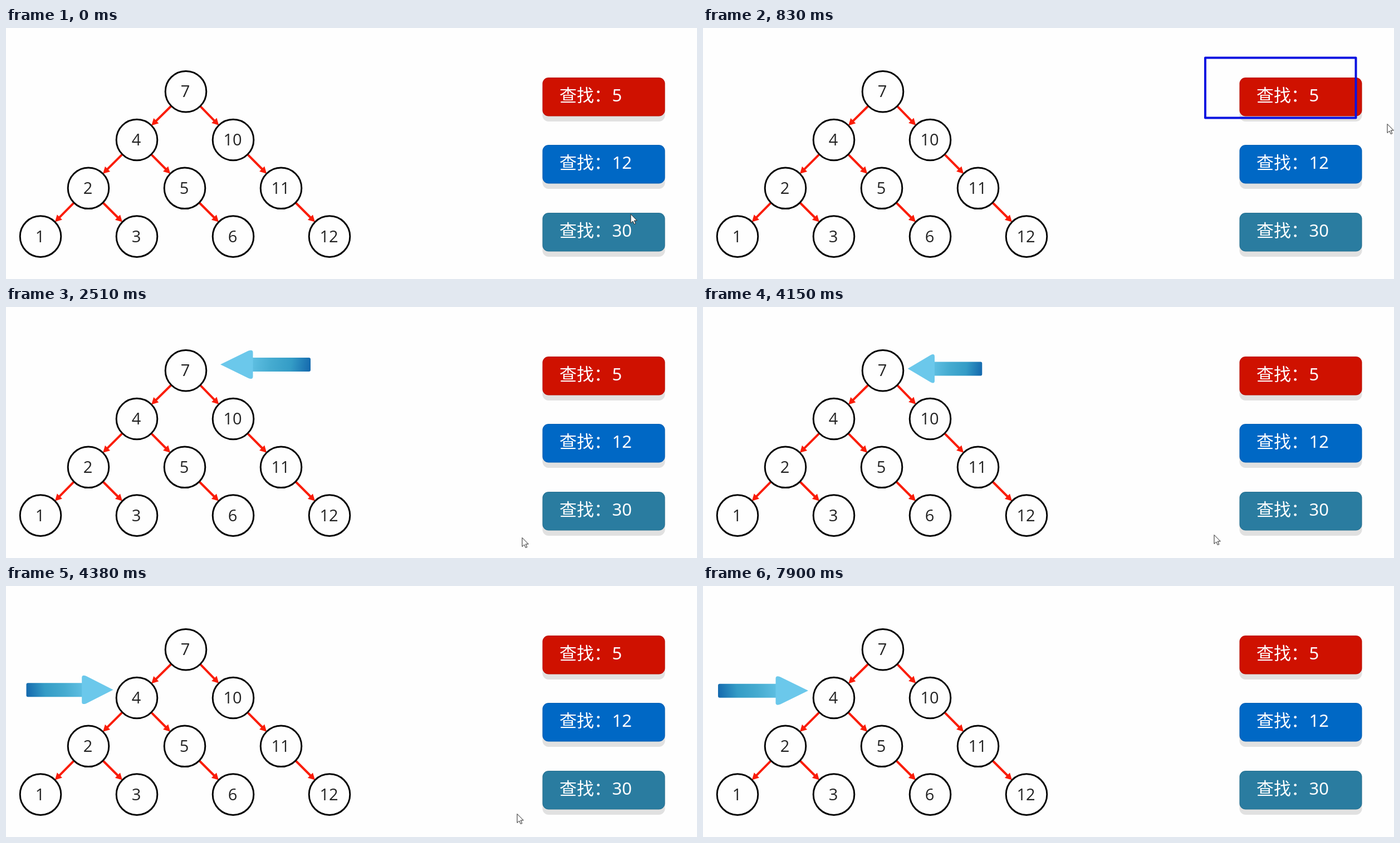
An HTML page with a canvas for the animation above (8000 ms loop, 1241 px wide and 451 px high).

```html
<!DOCTYPE html>
<html lang="zh-CN">
<head>
<meta charset="utf-8">
<title>二叉树查找</title>
<style>
html, body { margin: 0; width: 100%; height: 100%; overflow: hidden; background: #fefefe; }
canvas { display: block; }
</style>
</head>
<body>
<canvas id="stage" width="1241" height="451"></canvas>
<script>
const ctx = document.getElementById('stage').getContext('2d');
const LOOP = 8000;
const RADIUS = 36.8;
const ROW = 86.8;
const BUTTONS = [['5', '#cf1100'], ['12', '#0068c5'], ['30', '#2a7ca0']];

const clamp = u => Math.min(1, Math.max(0, u));
const mix = (a, b, u) => a + (b - a) * u;
const smooth = u => u * u * (3 - 2 * u);
const progress = (t, start, end) => clamp((t - start) / (end - start));
const hold = (t, start, step) => start + Math.floor((t - start) / step) * step;

// Search tree: each insertion walks down from the root.
const root = { value: 7, x: 323, y: 114.2, depth: 0 };
const nodes = [root];
for (const value of [4, 10, 2, 5, 11, 1, 3, 6, 12]) {
  let parent = root, side;
  while (parent[side = value < parent.value ? 'left' : 'right']) parent = parent[side];
  const dx = side === 'left' ? parent.depth - 88 : parent.depth + 85;
  const node = { value, parent, x: parent.x + dx, y: parent.y + ROW, depth: parent.depth + 1 };
  parent[side] = node;
  nodes.push(node);
}

function polygon(...points) {
  ctx.beginPath();
  points.forEach(([x, y]) => ctx.lineTo(x, y));
  ctx.closePath();
}

function roundBox(x, y, w, h, r, color) {
  ctx.fillStyle = color;
  ctx.beginPath();
  ctx.roundRect(x, y, w, h, r);
  ctx.fill();
}

function drawEdge({ x, y, parent }) {
  const length = Math.hypot(x - parent.x, y - parent.y);
  const tip = length - RADIUS;
  ctx.save();
  ctx.translate(parent.x, parent.y);
  ctx.rotate(Math.atan2(y - parent.y, x - parent.x));
  ctx.strokeStyle = ctx.fillStyle = '#fa1c08';
  ctx.lineWidth = 4;
  ctx.beginPath();
  ctx.moveTo(RADIUS + 1, 0);
  ctx.lineTo(tip - 9, 0);
  ctx.stroke();
  polygon([tip, 0], [tip - 12, -6.5], [tip - 12, 6.5]);
  ctx.fill();
  ctx.restore();
}

function drawNode({ value, x, y }) {
  ctx.strokeStyle = '#050505';
  ctx.lineWidth = 3;
  ctx.beginPath();
  ctx.arc(x, y, RADIUS, 0, Math.PI * 2);
  ctx.stroke();
  ctx.fillStyle = '#222';
  ctx.font = '29px "Open Sans", "Noto Sans", sans-serif';
  ctx.textAlign = 'center';
  ctx.fillText(value, x - 1, y + 10);
}

function drawButton([value, color], index) {
  const x = 963.5, y = Math.floor(89 + 121.5 * index);
  roundBox(x, y + 9, 220, 70, 11, '#e1e1e1');
  roundBox(x, y, 220, 69.5, 11, color);
  ctx.strokeStyle = 'rgba(0, 0, 0, .1)';
  ctx.lineWidth = 1;
  ctx.beginPath();
  ctx.roundRect(x + .5, y + .5, 219, 68.5, 10.5);
  ctx.stroke();
  ctx.fillStyle = '#fff';
  ctx.textAlign = 'left';
  ctx.font = '31px "Noto Sans CJK SC", "Noto Sans CJK", sans-serif';
  ctx.fillText('查找：', 994, y + 43);
  ctx.font = '31px "Noto Sans", "Open Sans", sans-serif';
  ctx.fillText(value, 1088.5, y + 43);
}

// Moves from the root to its left child while mirroring.
function drawArrow(p, alpha) {
  ctx.save();
  ctx.globalAlpha = alpha;
  ctx.translate(mix(466, 108, p), mix(103.3, 188, p));
  ctx.scale(1 - 2 * p, 1);
  const shade = ctx.createLinearGradient(-24, -8, 81, 8);
  ['#5fbfe2', '#45abd0', '#349cc6', '#1468ad'].forEach((c, i) => shade.addColorStop(i / 3, c));
  roundBox(-28, -12.3, 109, 25, 3, shade);
  ctx.fillStyle = '#6bc8eb';
  ctx.beginPath();
  ctx.moveTo(-81, 0);
  ctx.lineTo(-31, -24.5);
  ctx.quadraticCurveTo(-22, -28, -22.5, -21);
  ctx.lineTo(-22.5, 21);
  ctx.quadraticCurveTo(-22, 28, -31, 24.5);
  ctx.closePath();
  ctx.fill();
  ctx.restore();
}

function drawPointer(x, y) {
  ctx.save();
  ctx.translate(x, y + .5);
  polygon([0, 0], [0, 16], [3.8, 12.5], [6.3, 18], [8.8, 17], [6.3, 11.5], [11.3, 11.5]);
  ctx.fillStyle = '#fff';
  ctx.fill();
  ctx.strokeStyle = '#222';
  ctx.lineWidth = 1;
  ctx.stroke();
  ctx.restore();
}

// The pointer goes to the top left, then drags a frame that trails behind it.
function drawDrag(t) {
  const reach = smooth(progress(t, 30, 400));
  const pull = progress(t, 430, 830);
  const trail = progress(t, 430, 915);
  if (trail > 0) {
    ctx.strokeStyle = '#0a12e0';
    ctx.lineWidth = 4;
    ctx.lineJoin = 'round';
    ctx.strokeRect(902, 53.5, 328 * trail, 131 * trail);
    ctx.lineJoin = 'miter';
  }
  drawPointer(mix(mix(1122, 902, reach), 1229, pull), mix(mix(334, 52, reach), 172, pull));
}

function draw(t) {
  ctx.fillStyle = '#fefefe';
  ctx.fillRect(0, 0, 1241, 451);
  nodes.slice(1).forEach(drawEdge);
  nodes.forEach(drawNode);
  BUTTONS.forEach(drawButton);

  if (t < 1340) drawDrag(hold(Math.min(t, 930), 30, 50));
  else if (t < 3830) drawPointer(927, 414);
  else if (t < 4710) drawPointer(918, 409);

  if (t >= 2460) {
    const p = t < 4150 ? 0 : smooth(progress(hold(t, 4150, 46), 4093, 4405));
    drawArrow(p, t < 2510 ? .5 : 1);
  }
}

function tick(now) {
  draw(now % LOOP);
  requestAnimationFrame(tick);
}
draw(0);
requestAnimationFrame(tick);
</script>
</body>
</html>
```
